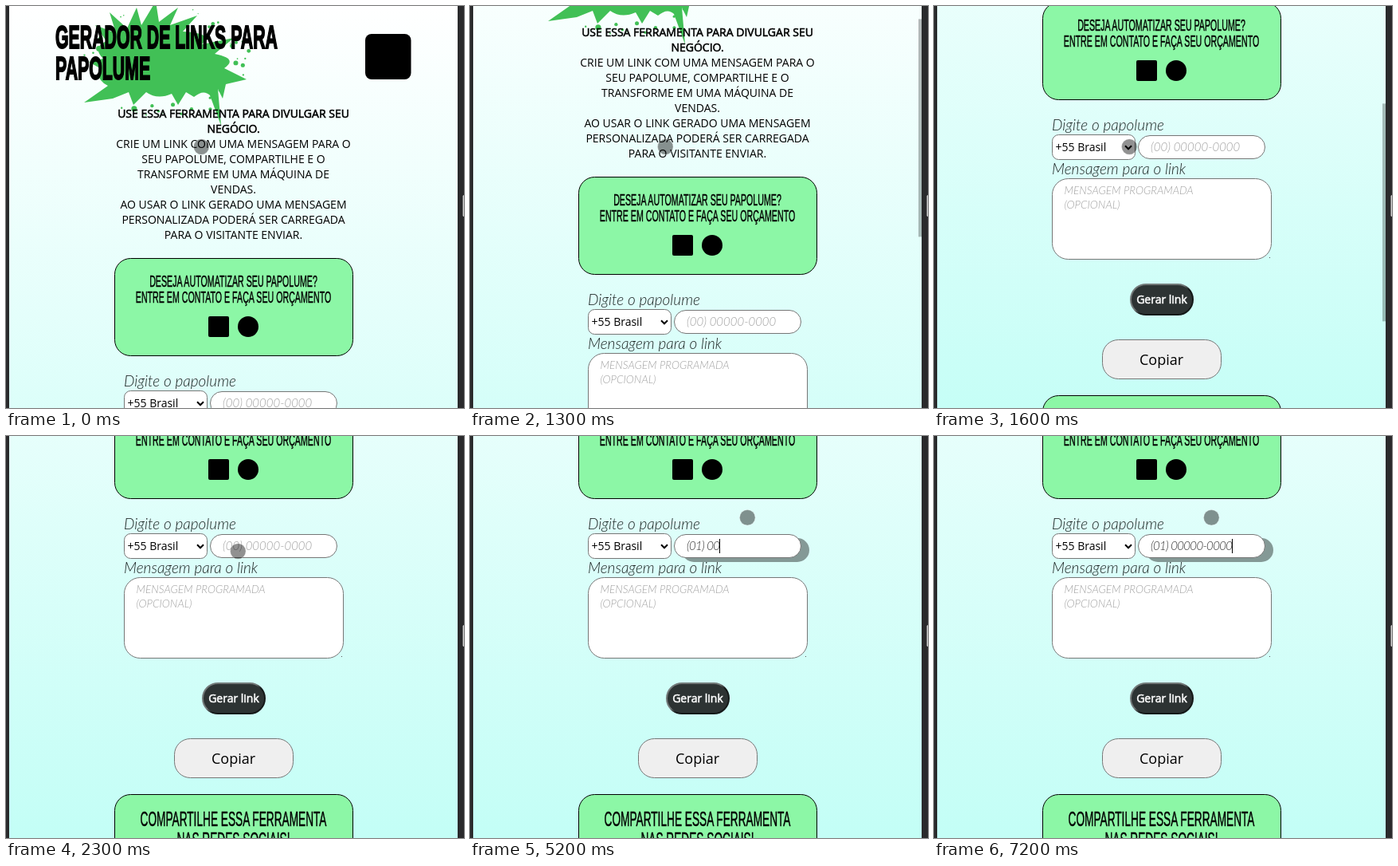
An HTML page for the animation above (8000 ms loop, 575 by 504 pixels).

```html
<!DOCTYPE html>
<html lang="pt-BR">
<head>
<meta charset="utf-8">
<title>Gerador de links</title>
<style>
  html, body { margin: 0; width: 100%; height: 100%; overflow: hidden; background: #2a2a2c; }
  svg { display: block; width: 575px; height: 504px; }
  text { font: 14px "Open Sans", sans-serif; white-space: pre; }
  .mid { text-anchor: middle; }
  .strong { stroke: currentColor; stroke-width: .55px; }
  .hand { font-family: "Liberation Sans", Arial, sans-serif; stroke: #000; stroke-width: .5px; }
  .title { font-size: 41px; font-weight: 700; stroke-width: 2px; }
  .note { font-size: 20.5px; }
  .share { font-size: 26.3px; }
  .slim { font-family: Lato, sans-serif; font-weight: 300; font-style: italic; }
  .label { font-size: 19px; fill: #1c2222; }
  .hint { fill: #a0a0a0; }
  .number { font-size: 15px; }
  .typed { fill: #333; letter-spacing: -.67px; }
  .area { font-size: 13.6px; }
  .field { fill: #fff; stroke: #767676; }
  .card { fill: #8cf7a6; stroke: #000; }
</style>
</head>
<body>
<svg viewBox="0 0 575 504">
  <defs>
    <linearGradient id="sky" gradientUnits="userSpaceOnUse" x1="0" y1="0" x2="0" y2="864">
      <stop offset="0" stop-color="#fff"/>
      <stop offset="1" stop-color="#c3fef6"/>
    </linearGradient>
    <linearGradient id="bevel" x1="0" y1="0" x2="1" y2="1">
      <stop offset=".45" stop-color="#737979"/>
      <stop offset=".55" stop-color="#141818"/>
    </linearGradient>
    <clipPath id="view"><rect x="4" width="563" height="504"/></clipPath>
  </defs>
  <rect width="575" height="504" fill="#2a2a2c"/>
  <rect x="573.5" y="237" width="3" height="27" rx="1.5" fill="#d0d0d0"/>
  <g clip-path="url(#view)">
    <g id="page">
      <rect width="575" height="900" fill="url(#sky)"/>
      <g id="splash" fill="#41c056">
        <path d="M98 121L128 100Q112 92 118 78L104 70L122 66Q108 52 126 44L112 24L138 34L130 8L152 28L164 2L170 24L188 -6L192 20L216 2L206 24L240 12L222 32Q262 34 246 48L286 40L262 60Q292 66 274 78L302 92L276 98L272 116L266 104L270 150L256 112Q248 104 236 114L226 108L216 124L208 110Q190 118 176 108L160 124L154 108L134 116Z"/>
      </g>
      <g id="copy"></g>
      <rect x="451" y="35" width="57.5" height="57" rx="8"/>

      <rect class="card" x="136.5" y="316.5" width="299" height="122" rx="20"/>
      <rect x="254" y="389" width="26" height="26" rx="2"/>
      <circle cx="304" cy="402" r="13"/>

      <rect class="field" x="148.5" y="482.5" width="104" height="31" rx="8"/>
      <path d="M240 496.3l4 4l4-4" fill="none" stroke="#000" stroke-width="2"/>
      <rect id="shadow" x="266" y="488" width="160" height="30" rx="15" opacity=".4"/>
      <rect class="field" x="256.5" y="483.5" width="159" height="29" rx="14.5"/>
      <text id="placeholder" class="slim hint number" x="272" y="503">(00) 00000-0000</text>
      <text id="typed" class="slim number typed" x="272" y="503"></text>
      <rect id="caret" y="489" width="1" height="18"/>

      <rect class="field" x="148.5" y="537.5" width="275" height="101" rx="20"/>
      <rect x="421" y="636" width="1" height="1" fill="#555"/>

      <rect x="247" y="670" width="78" height="38" rx="19" fill="#2d3333" stroke="url(#bevel)" stroke-width="2"/>
      <rect x="211.5" y="739.5" width="149" height="49" rx="20" fill="#efefef" stroke="#767676"/>
      <rect class="card" x="136.5" y="809.5" width="299" height="130" rx="20"/>
      <g id="front"></g>
    </g>
    <rect id="thumb" x="563" width="4" height="273"/>
    <circle id="pointer" r="9.8" fill="rgba(0,0,0,.43)" stroke="rgba(255,255,255,.35)"/>
  </g>
</svg>
<script>
const LOOP = 8000, STEP = 100, CONDENSED = 0.52;
const $ = id => document.getElementById(id);

function add(parent, tag, attrs, text = "") {
  const node = document.createElementNS("http://www.w3.org/2000/svg", tag);
  for (const name in attrs) node.setAttribute(name, attrs[name]);
  node.textContent = text;
  parent.append(node);
  return node;
}
const write = (parent, cls, x, y, text, fill = "#000") =>
  add(parent, "text", { class: cls, x, y, fill, color: fill }, text);
const writeHand = (parent, cls, x, y, text) =>
  add(parent, "text", { class: "hand " + cls, transform: `translate(${x} ${y}) scale(${CONDENSED} 1)` }, text);

// Paint droplets around the splash
let seed = 11;
const random = () => (seed = seed * 16807 % 2147483647) / 2147483647;
for (let i = 0; i < 46; i++) {
  const angle = random() * Math.PI * 2, reach = 0.85 + random() * 0.3;
  add($("splash"), "circle", {
    cx: 200 + Math.cos(angle) * 92 * reach,
    cy: 66 + Math.sin(angle) * 66 * reach,
    r: 0.6 + random() ** 2 * 3
  });
}

const copy = $("copy"), front = $("front");
writeHand(copy, "title", 62, 53, "GERADOR DE LINKS PARA");
writeHand(copy, "title", 62, 92, "PAPOLUME");
[
  "USE ESSA FERRAMENTA PARA DIVULGAR SEU", "NEGÓCIO.",
  "CRIE UM LINK COM UMA MENSAGEM PARA O", "SEU PAPOLUME, COMPARTILHE E O",
  "TRANSFORME EM UMA MÁQUINA DE", "VENDAS.",
  "AO USAR O LINK GERADO UMA MENSAGEM", "PERSONALIZADA PODERÁ SER CARREGADA",
  "PARA O VISITANTE ENVIAR."
].forEach((line, i) => write(copy, i < 2 ? "mid strong" : "mid", 285.5, 140 + i * 19, line));

writeHand(front, "note mid", 285.5, 352, "DESEJA AUTOMATIZAR SEU PAPOLUME?");
writeHand(front, "note mid", 285.5, 372, "ENTRE EM CONTATO E FAÇA SEU ORÇAMENTO");
write(front, "slim label", 148, 477, "Digite o papolume");
write(front, "", 152.5, 503, "+55 Brasil");
write(front, "slim label", 148, 532, "Mensagem para o link");
write(front, "slim hint area", 163.5, 557, "MENSAGEM PROGRAMADA");
write(front, "slim hint area", 163.5, 575, "(OPCIONAL)");
write(front, "mid strong", 286, 694, "Gerar link", "#fff").style.color = "#fff";
const copyLabel = write(front, "mid", 285.5, 771, "Copiar");
copyLabel.style.fontSize = "18px";
writeHand(front, "share mid", 285.5, 849, "COMPARTILHE ESSA FERRAMENTA");
writeHand(front, "share mid", 285.5, 875, "NAS REDES SOCIAIS!");

const SCROLL_START = 1200, SCROLL = [0, 44, 102, 168, 240, 321, 360];
const MOVE_START = 1800, MOVE_STEPS = 5, FOCUS = 3300;

// The mask is applied one moment after some key presses
const TYPING = [
  [4100, "0"], [4300, "01"], [4700, "010"], [4900, "(01) 0"], [5200, "(01) 00"],
  [5600, "(01) 000"], [5800, "(01) 0000"], [6300, "(01) 00000"], [6400, "(01) 0000-0"],
  [6600, "(01) 0000-00"], [6800, "(01) 0000-000"], [7000, "(01) 0000-0000"],
  [7200, "(01) 00000-0000"]
];

const clamp = (v, lo, hi) => Math.min(hi, Math.max(lo, v));
const show = (node, on) => node.setAttribute("visibility", on ? "visible" : "hidden");

function render(time) {
  const t = Math.floor(time / STEP) * STEP;

  const scroll = SCROLL[clamp((t - SCROLL_START) / STEP + 1, 0, SCROLL.length - 1)];
  $("page").setAttribute("transform", `translate(0 ${-scroll})`);

  const move = clamp((t - MOVE_START) / STEP / MOVE_STEPS, 0, 1);
  $("thumb").setAttribute("y", -33 + scroll * 0.484);
  $("thumb").setAttribute("opacity", scroll ? 0.27 * (1 - move) : 0);

  const focused = t >= FOCUS;
  const glide = move * move * (3 - 2 * move);
  $("pointer").setAttribute("cx", focused ? 348.3 : 245.3 + 46 * glide);
  $("pointer").setAttribute("cy", focused ? 102.3 : 176.5 - 32 * glide);

  const entry = TYPING.filter(([at]) => at <= t).pop();
  const value = entry ? entry[1] : "";
  const typed = $("typed");
  if (typed.textContent !== value) typed.textContent = value;
  show($("placeholder"), !value);
  show($("shadow"), focused);
  show($("caret"), focused);
  $("caret").setAttribute("x", Math.round(272 + (value ? typed.getComputedTextLength() : 0)));
}

function frame() {
  render(performance.now() % LOOP);
  requestAnimationFrame(frame);
}
frame();
</script>
</body>
</html>
```
